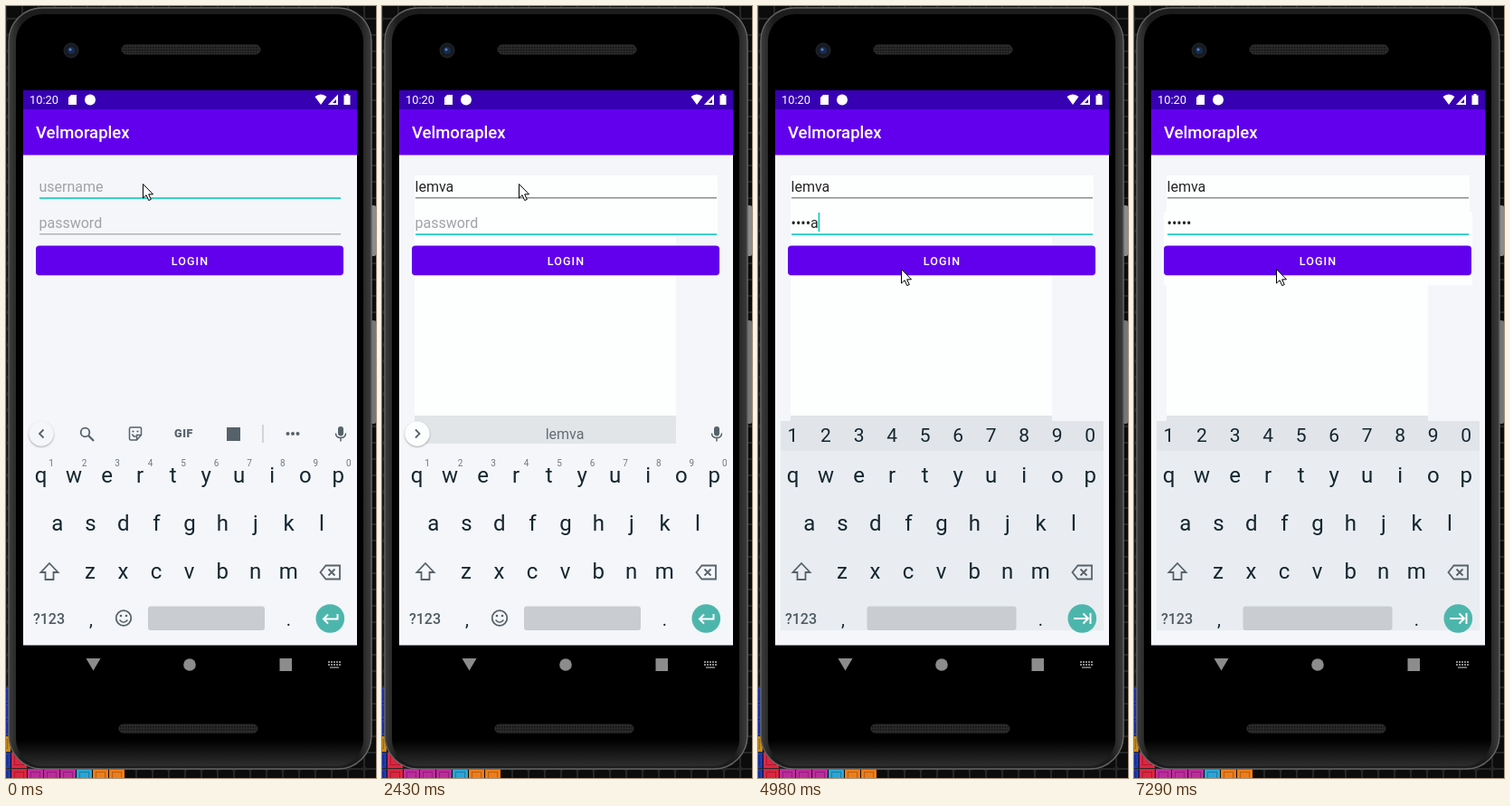
Recreate the animation shown at these times as an HTML page. Size 409x852 px, loop 8 s.

```html
<!DOCTYPE html>
<html lang="en">
<head>
<meta charset="utf-8">
<title>Login screen</title>
<style>
  html, body { margin: 0; width: 100%; height: 100%; overflow: hidden; background: #141414; }
  svg { display: block; width: 409px; height: 852px; font-family: Roboto, sans-serif; }
  .mid { text-anchor: middle; }
  .line { fill: none; stroke: #56626a; stroke-width: 1.8; }
  .key { font-size: 24px; fill: #14262f; }
  .sup { font-size: 10px; fill: #6f787e; }
  .field { font-size: 16px; }
</style>
</head>
<body>
<svg viewBox="0 0 409 852">
  <defs>
    <pattern id="grid" width="18" height="18" patternUnits="userSpaceOnUse" y="-4">
      <rect width="18" height="18" fill="#262626"/>
      <rect x="1" y="1" width="16" height="16" rx="2" fill="#0c0c0c"/>
    </pattern>
    <pattern id="mesh" width="3" height="3" patternUnits="userSpaceOnUse">
      <rect width="3" height="3" fill="#292929"/><rect width="1.5" height="1.5" fill="#111"/>
    </pattern>
    <linearGradient id="rim">
      <stop offset="0" stop-color="#3c3c3c"/><stop offset=".035" stop-color="#1c1c1c"/>
      <stop offset=".965" stop-color="#1c1c1c"/><stop offset="1" stop-color="#3c3c3c"/>
    </linearGradient>
    <linearGradient id="glass" x2="0" y2="1">
      <stop offset=".965"/><stop offset="1" stop-color="#2e2e2e"/>
    </linearGradient>
    <filter id="soft" x="-30%" y="-30%" width="160%" height="160%">
      <feDropShadow dx="0" dy="1" stdDeviation="1" flood-opacity=".4"/>
    </filter>
    <clipPath id="buttonClip"><rect x="33" y="264.5" width="340" height="32.5" rx="4"/></clipPath>
    <clipPath id="stripClip"><rect x="36" y="452" width="289" height="31"/></clipPath>
  </defs>

  <!-- desktop and phone body -->
  <rect width="409" height="852" fill="url(#grid)"/>
  <g id="blocks"></g>
  <rect x="403" y="220" width="6" height="56" rx="2" fill="#8b8b8b"/>
  <rect x="403" y="347" width="6" height="114" rx="2" fill="#777"/>
  <rect x="3" y="2" width="401" height="840" rx="37" fill="url(#rim)" stroke="#666" stroke-width="1.4"/>
  <rect x="11" y="9" width="384" height="830" rx="30" fill="url(#glass)"/>
  <rect x="128" y="43" width="153" height="10" rx="5" fill="url(#mesh)" stroke="#333"/>
  <rect x="125" y="793" width="153" height="9" rx="4.5" fill="url(#mesh)" stroke="#333"/>
  <circle cx="72" cy="49" r="8" fill="#171a20" stroke="#25282e"/>
  <circle cx="72" cy="49" r="4" fill="#182c50"/>
  <circle cx="71" cy="48" r="1.5" fill="#5c86bd"/>

  <!-- status and title bars -->
  <rect x="19" y="93" width="369" height="612.5" fill="#f4f6f9"/>
  <rect x="19" y="93" width="369" height="21" fill="#3700b3"/>
  <rect x="19" y="114" width="369" height="50.5" fill="#6200ee"/>
  <g fill="#fff">
    <text x="26" y="108" font-size="12.8">10:20</text>
    <path d="M72 98h6v11h-9v-8z"/>
    <circle cx="93" cy="103.5" r="6"/>
    <path d="M341.500 100q6.500-5 13 0l-6.500 9zM367 97.500v11.500h-11z"/>
    <path d="M375.500 97h3v1.500h2v10.500h-7v-10.500h2z"/>
    <path d="M365 103v4h-4z" fill="#3700b3"/>
    <text x="33" y="146" font-size="18.5" font-weight="500">Velmoraplex</text>
  </g>

  <!-- repainted areas -->
  <g id="typedArea" fill="#fdfefe">
    <rect x="36" y="187" width="289" height="265"/>
    <rect x="36" y="452" width="289" height="31" fill="#e1e5e8"/>
  </g>
  <rect id="fieldArea" x="36" y="187" width="335" height="67" fill="#fdfefe"/>
  <rect id="pressArea" x="33" y="227" width="341" height="81" fill="#fdfefe"/>

  <!-- form -->
  <text id="user" class="field" x="36.500" y="205"/>
  <text id="pass" class="field" x="36.500" y="245"/>
  <rect id="composing" x="37" y="206" height="1" fill="#333"/>
  <rect id="userLine" x="37" width="333"/>
  <rect id="passLine" x="37" width="333"/>
  <rect id="userCaret" y="188" width="1.600" height="21" fill="#03cdbb"/>
  <rect id="passCaret" y="228" width="1.600" height="21" fill="#03cdbb"/>
  <rect x="33" y="265" width="340" height="32.500" rx="4" fill="#6200ee" opacity=".5"/>
  <g clip-path="url(#buttonClip)">
    <rect x="33" y="264" width="340" height="34" fill="#6200ee"/>
    <circle id="ripple" cx="160" cy="291" fill="#fff"/>
  </g>
  <text class="mid" x="203.500" y="286" font-size="12.5" font-weight="500" letter-spacing="1.1" fill="#fff">LOGIN</text>

  <!-- keyboard -->
  <g id="numberArea">
    <rect x="25" y="458" width="357" height="231" fill="#e9edf1"/>
    <rect x="25" y="458" width="357" height="33" fill="#e1e5e9"/>
  </g>
  <g id="strip">
    <g id="tools" fill="#56626a">
      <circle class="line" cx="87.500" cy="470.500" r="4.800"/>
      <path class="line" d="M91 474l6 6" style="stroke-width:2.300"/>
      <path class="line" d="M136.500 466.500q0-1.500 1.500-1.500h10q1.500 0 1.500 1.500v7l-5 5.500h-6.500q-1.500 0-1.500-1.500zM149.500 473.500h-5v5M139.500 472.500q1 3 4 2.500" style="stroke-width:1.500"/>
      <circle cx="140.500" cy="469.500" r="1.100"/><circle cx="145.500" cy="469.500" r="1.100"/>
      <text class="mid" x="196.500" y="476.300" font-size="12.500" font-weight="900" letter-spacing=".6">GIF</text>
      <rect x="244" y="465" width="15" height="15"/>
      <rect x="283.500" y="462" width="1" height="20" fill="#aeb4b9"/>
      <circle cx="311.500" cy="472" r="2"/><circle cx="317" cy="472" r="2"/><circle cx="322.500" cy="472" r="2"/>
    </g>
    <g id="hints" class="field" clip-path="url(#stripClip)" fill="#656c71">
      <path id="dividers" d="M148.500 461v22M256.500 461v22" stroke="#c3c8cc"/>
      <text class="mid" x="100" y="478"/>
      <text class="mid" x="202" y="478"/>
      <text class="mid" x="304" y="478"/>
    </g>
    <circle id="knob" cx="39" cy="472" r="13.500" filter="url(#soft)"/>
    <path id="chevron" class="line"/>
    <rect x="367" y="464" width="6" height="10.500" rx="3" fill="#56626a"/>
    <path class="line" d="M364.500 471.500q0 5 5.500 5t5.500-5M370 477v3.500" style="stroke-width:1.500"/>
  </g>
  <g id="keys"></g>
  <g id="sups"></g>
  <g id="digits"></g>
  <path class="line" d="M48 615l9.500 10h-5v8h-9v-8h-5z"/>
  <path class="line" d="M347.500 625l6-7.500h15.500v15h-15.500zM356.500 621.500l7 7M363.500 621.500l-7 7"/>
  <text class="mid" x="47.500" y="682" font-size="16" font-weight="500" fill="#4e5b63">?123</text>
  <g id="smile">
    <circle class="line" cx="130" cy="675.500" r="8.300"/>
    <path class="line" d="M125.500 677.500q4.500 5.500 9 0" style="stroke-width:1.500"/>
    <circle cx="127" cy="673" r="1.300" fill="#56626a"/><circle cx="133" cy="673" r="1.300" fill="#56626a"/>
  </g>
  <rect id="space" y="662.500" height="26.500" rx="3" fill="#c9ccd0"/>
  <circle cx="358.300" cy="676" r="15.800" fill="#4db6ac"/>
  <path id="enter" fill="none" stroke="#fff" stroke-width="2"/>

  <!-- navigation -->
  <g fill="#8c8c8c">
    <path d="M88.500 720h16l-8 13.500z"/>
    <circle cx="203" cy="727" r="6.800"/>
    <rect x="302.500" y="720" width="13.500" height="14"/>
    <path d="M356 724h14M356 727h14" stroke="#8c8c8c" stroke-width="2" stroke-dasharray="2 1"/>
    <path d="M358 730h10" stroke="#8c8c8c" stroke-width="1.500"/>
  </g>
  <path id="mouse" d="M0 0V15.500L3.600 12.200L6.200 18L8.800 17L6.200 11.300H11Z" fill="#fff" stroke="#000"/>
</svg>

<script>
const LOOP = 8000;
const NAME = 'lemva';
const $ = id => document.getElementById(id);
const set = (id, attrs) => {
  for (const k in attrs) $(id).setAttribute(k, attrs[k]);
};
const show = (id, on) => { $(id).style.display = on ? '' : 'none'; };

function add(parent, tag, attrs, text = '') {
  const el = document.createElementNS('http://www.w3.org/2000/svg', tag);
  for (const k in attrs) el.setAttribute(k, attrs[k]);
  el.textContent = text;
  $(parent).append(el);
}

function row(parent, chars, x, y, cls, size) {
  [...chars].forEach((c, i) => {
    const attrs = { x: x + 36.53 * i, y, class: 'mid ' + cls };
    if (size) attrs.style = `font-size:${size}px`;
    add(parent, 'text', attrs, c);
  });
}

row('keys', 'qwertyuiop', 38.5, 526, 'key');
row('keys', 'asdfghjkl', 56.8, 579, 'key');
row('keys', 'zxcvbnm', 93, 632, 'key');
add('keys', 'text', { x: 94, y: 684, class: 'mid key', style: 'font-size:20px' }, ',');
add('keys', 'text', { x: 312.5, y: 684, class: 'mid key', style: 'font-size:20px' }, '.');
row('sups', '1234567890', 50, 508, 'sup');
row('digits', '1234567890', 38.5, 480.5, 'key', 21);

const block = (x, y, fill) => {
  add('blocks', 'rect', { x, y, width: 17, height: 17, fill });
  add('blocks', 'rect', { x: x + 3.5, y: y + 3.5, width: 10, height: 10, fill: 'none', stroke: '#000', 'stroke-opacity': .25 });
};
['#2338a8', '#2338a8', '#2338a8', '#c98a1c', '#2338a8', '#2338a8']
  .forEach((fill, i) => block(-12, 752 + 18 * i, fill));
block(6, 824, '#df2440');
['#df2440', '#bd2b9d', '#bd2b9d', '#bd2b9d', '#2aa5d6', '#f07d18', '#f07d18']
  .forEach((fill, i) => block(6 + 18 * i, 842, fill));

// Each track is a list of [start time, ...values]; the latest started step holds.
const at = (track, t) => track.filter(step => step[0] <= t).pop();

const userKeys = [[0, 0], [960, 1], [1080, 2], [1330, 3], [1450, 4], [1590, 5]];
const passKeys = [[0, 0], [3280, 1], [3440, 2], [3590, 3], [3710, 4], [3860, 5]];
const words = [
  [0, '', '', ''], [960, 'l', 'look', 'let'], [1080, 'le', 'let', 'left'],
  [1330, 'lem', 'lemon', 'lemons'], [1450, '', NAME.slice(0, 4), ''], [1590, '', NAME, '']
];
const blink = [
  [0, 0], [2550, 1], [2980, 0], [3280, 1], [4440, 0], [4830, 1],
  [5270, 0], [5830, 1], [6290, 0], [6860, 1], [7290, 0]
];
const pointer = [
  [0, 151.5, 196.5], [4440, 152.5, 226.5], [4590, 157.5, 270.5],
  [4710, 158.5, 287.5], [4830, 159.5, 291.5], [4980, 158.5, 290.5], [5270, 157.5, 290.5]
];
const ripples = [[0, 0, 0], [5270, 90, .12], [5400, 230, .1], [5530, 0, 0]];

function field(id, text, hint) {
  $(id).textContent = text || hint;
  $(id).setAttribute('fill', text ? '#252525' : '#a0a3a6');
  return text ? $(id).getComputedTextLength() : 0;
}

function underline(id, y, focused, filled) {
  set(id, {
    y: y - .8,
    height: focused ? 1.7 : 1.2,
    fill: focused ? '#1accc0' : filled ? '#727272' : '#a1a4a6'
  });
}

function draw(t) {
  const typed = t >= 960;
  const onPass = t >= 2430;
  const numbers = t >= 2550;
  const user = NAME.slice(0, at(userKeys, t)[1]);
  const count = at(passKeys, t)[1];
  const pass = t >= 5400 ? '•'.repeat(5)
    : count ? '•'.repeat(count - 1) + NAME[count - 1] : '';

  show('typedArea', typed);
  show('fieldArea', onPass);
  show('pressArea', t >= 5270);

  const userEnd = field('user', user, 'username');
  const passEnd = field('pass', pass, 'password');
  set('composing', { width: onPass ? 0 : userEnd });
  underline('userLine', 212, !onPass, user);
  underline('passLine', 252, onPass, pass);
  set('userCaret', { x: 36.3 + userEnd });
  set('passCaret', { x: 36.3 + passEnd });
  show('userCaret', t >= 400 && !onPass);
  show('passCaret', at(blink, t)[1]);

  const [, r, opacity] = at(ripples, t);
  set('ripple', { r, opacity });

  const hint = at(words, t).slice(1);
  $('hints').querySelectorAll('text').forEach((el, i) => {
    el.textContent = hint[i];
    const best = i === 1 && hint[0];
    el.setAttribute('font-weight', best ? 700 : 400);
    el.setAttribute('fill', best ? '#101010' : '#656c71');
  });
  show('dividers', hint[0]);
  show('tools', !typed);
  show('hints', typed);
  show('strip', !numbers);
  set('knob', { fill: typed ? '#fdfefe' : '#f4f6f9' });
  set('chevron', { d: typed ? 'M37 467.500l4.500 4.500l-4.500 4.500' : 'M41.500 467.500l-4.500 4.500l4.500 4.500' });

  show('numberArea', numbers);
  show('digits', numbers);
  show('sups', !numbers);
  show('smile', !numbers);
  set('space', numbers ? { x: 120.5, width: 165 } : { x: 157, width: 129 });
  set('enter', {
    d: numbers ? 'M349 676h15M359.500 670.500l5.500 5.500l-5.500 5.500M367.500 670v12'
      : 'M366.500 671v5.500h-15.500M356 671.500l-5 5l5 5'
  });

  const [, x, y] = at(pointer, t);
  set('mouse', { transform: `translate(${x} ${y})` });
}

const start = performance.now();
function tick() {
  draw((performance.now() - start) % LOOP);
  requestAnimationFrame(tick);
}
tick();
</script>
</body>
</html>
```
